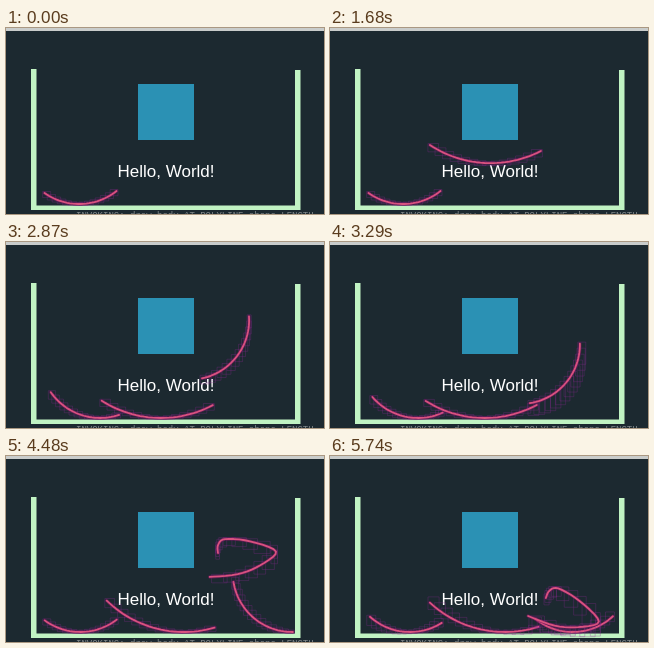
An HTML page with a canvas that plays this animation: 318x186 px, repeating every 5.81 s.

```html
<!DOCTYPE html>
<html lang="en">
<head>
<meta charset="utf-8">
<title>Drawn physics strokes</title>
<style>
  html, body { margin: 0; width: 100%; height: 100%; overflow: hidden; background: #1c2930; }
  svg, canvas { position: absolute; left: 0; top: 0; width: 318px; height: 186px; }
  .hello { font: 17px "Liberation Sans", Arial, sans-serif; fill: #fff; text-anchor: middle; }
  .log { font: 9px "Liberation Mono", monospace; fill: #83898b; }
</style>
</head>
<body>
<svg viewBox="0 0 318 186">
  <rect width="318" height="186" fill="#1c2930"/>
  <rect width="318" height="3" fill="#c9cccb"/>
  <rect x="132" y="56" width="56" height="56" fill="#2b91b4"/>
  <text class="hello" x="160" y="149.3">Hello, World!</text>
  <text class="log" x="70" y="189.5">INVOKING: draw body AT POLYLINE shape LENGTH</text>
  <path d="M25 41h5.5v136.5H289V42h5.5v140H25z" fill="#c1f3c3"/>
</svg>
<canvas id="stage" width="318" height="186"></canvas>
<script>
const LOOP = 5810, STEP = 70, FLOOR = 176, RAD = Math.PI / 180;
const ctx = document.getElementById('stage').getContext('2d');
const clamp = u => Math.max(0, Math.min(1, u));
const ease = u => u * u * (3 - 2 * u);

// Eased turning between a few [time, degrees] extremes
function swing(keys, t) {
  return keys.slice(1).reduce((angle, [time, degrees], i) => {
    const [lastTime, last] = keys[i];
    return angle + (degrees - last) * ease(clamp((t - lastTime) / (time - lastTime)));
  }, keys[0][1]);
}

// Circular stroke: falls to the floor, then rolls on it, so its turn sets its place
function arc({ from, to, sag, draw, release = 0, fallTime = 1, slide = 0, turns }) {
  const dx = to[0] - from[0], dy = to[1] - from[1];
  const half = Math.hypot(dx, dy) / 2, tilt = Math.atan2(dy, dx);
  const radius = (half * half + sag * sag) / (2 * sag), size = Math.abs(radius);
  const x0 = (from[0] + to[0]) / 2 + Math.sin(tilt) * (radius - sag);
  const y0 = (from[1] + to[1]) / 2 - Math.cos(tilt) * (radius - sag);
  const spread = Math.asin(half / radius);
  const local = Array.from({ length: 29 }, (_, i) => {
    const a = spread * (i / 14 - 1);
    return [radius * Math.sin(a), radius * Math.cos(a)];
  });
  const pose = t => {
    const fallen = clamp((t - release) / fallTime) ** 2;
    const turn = swing(turns, t) * RAD;
    return [x0 + slide * fallen + size * turn, y0 + (FLOOR - size - y0) * fallen, tilt + turn];
  };
  return { local, pose, draw };
}

// Catmull-Rom curve through a few points
function smooth(points, parts = 5) {
  const at = i => points[Math.max(0, Math.min(points.length - 1, i))];
  return Array.from({ length: (points.length - 1) * parts + 1 }, (_, n) => {
    const i = Math.floor(n / parts), u = n / parts - i;
    return [0, 1].map(c => {
      const [a, b, d, e] = [-1, 0, 1, 2].map(k => at(i + k)[c]);
      return b + u * (d - a) / 2 + u * u * (a - 2.5 * b + 2 * d - e / 2) + u ** 3 * (3 * (b - d) + e - a) / 2;
    });
  });
}

const bodies = [
  arc({ from: [38.5, 165], to: [110.5, 163], sag: 12, draw: [-2, -1],
    turns: [[1960, 0], [2380, 23], [4480, 1], [5180, 24], [6000, 1]] }),
  arc({ from: [100, 116], to: [211, 122], sag: 15, draw: [980, 1540], release: 1610, fallTime: 450, slide: -4,
    turns: [[1610, 0], [3290, -1], [4480, 11], [5180, -4], [5880, 11]] }),
  arc({ from: [242, 68], to: [195, 130], sag: -14.5, draw: [2030, 2450], release: 2520, fallTime: 930, slide: 7,
    turns: [[3150, 0], [4480, 93], [6100, 45]] }),
  {
    // Hook that sinks onto the stroke below while tipping over
    local: smooth([[4, -12], [4, -20], [11, -26], [36, -24], [62, -14], [46, 0], [24, 9], [-4, 12]]),
    draw: [3780, 4270],
    pose(t) {
      const u = clamp((t - 4270) / 1470);
      return [208 - u, 102 + 49 * u, 26 * RAD * u * u];
    }
  }
];

function place({ local, pose }, t) {
  const [x, y, angle] = pose(t);
  const c = Math.cos(angle), s = Math.sin(angle);
  return local.map(([px, py]) => [x + px * c - py * s, y + px * s + py * c]);
}

function line(points, color, width) {
  ctx.beginPath();
  points.forEach(p => ctx.lineTo(...p));
  ctx.strokeStyle = color;
  ctx.lineWidth = width;
  ctx.stroke();
}

// Bounding boxes of the segments, stretched along their movement
function boxes(points, before) {
  ctx.strokeStyle = 'rgba(143, 42, 148, .42)';
  ctx.lineWidth = .7;
  for (let i = 2; i < points.length; i += 2) {
    const a = points[i - 2], b = points[i];
    const [[left, width], [top, height]] = [0, 1].map(c => {
      const move = b[c] - before[i][c];
      return [Math.min(a[c], b[c]) + Math.min(0, move) - 1.5, Math.abs(a[c] - b[c]) + Math.abs(move) + 3];
    });
    ctx.strokeRect(left, top, width, height);
  }
}

function render(t) {
  ctx.clearRect(0, 0, 318, 186);
  ctx.lineCap = ctx.lineJoin = 'round';
  for (const body of bodies) {
    const [start, end] = body.draw;
    if (t < start) continue;
    const points = place(body, t);
    if (t < end) {
      const count = Math.max(2, Math.ceil(points.length * (t - start) / (end - start)));
      line(points.slice(0, count), '#b31232', 1.8);
    } else {
      boxes(points, place(body, t - 2 * STEP));
      line(points, 'rgba(112, 24, 92, .65)', 3.4);
      line(points, '#d9527f', 1.8);
    }
  }
}

const origin = performance.now();
function tick() {
  const t = (performance.now() - origin) % LOOP;
  render(Math.floor(t / STEP) * STEP);
  requestAnimationFrame(tick);
}
tick();
</script>
</body>
</html>
```
